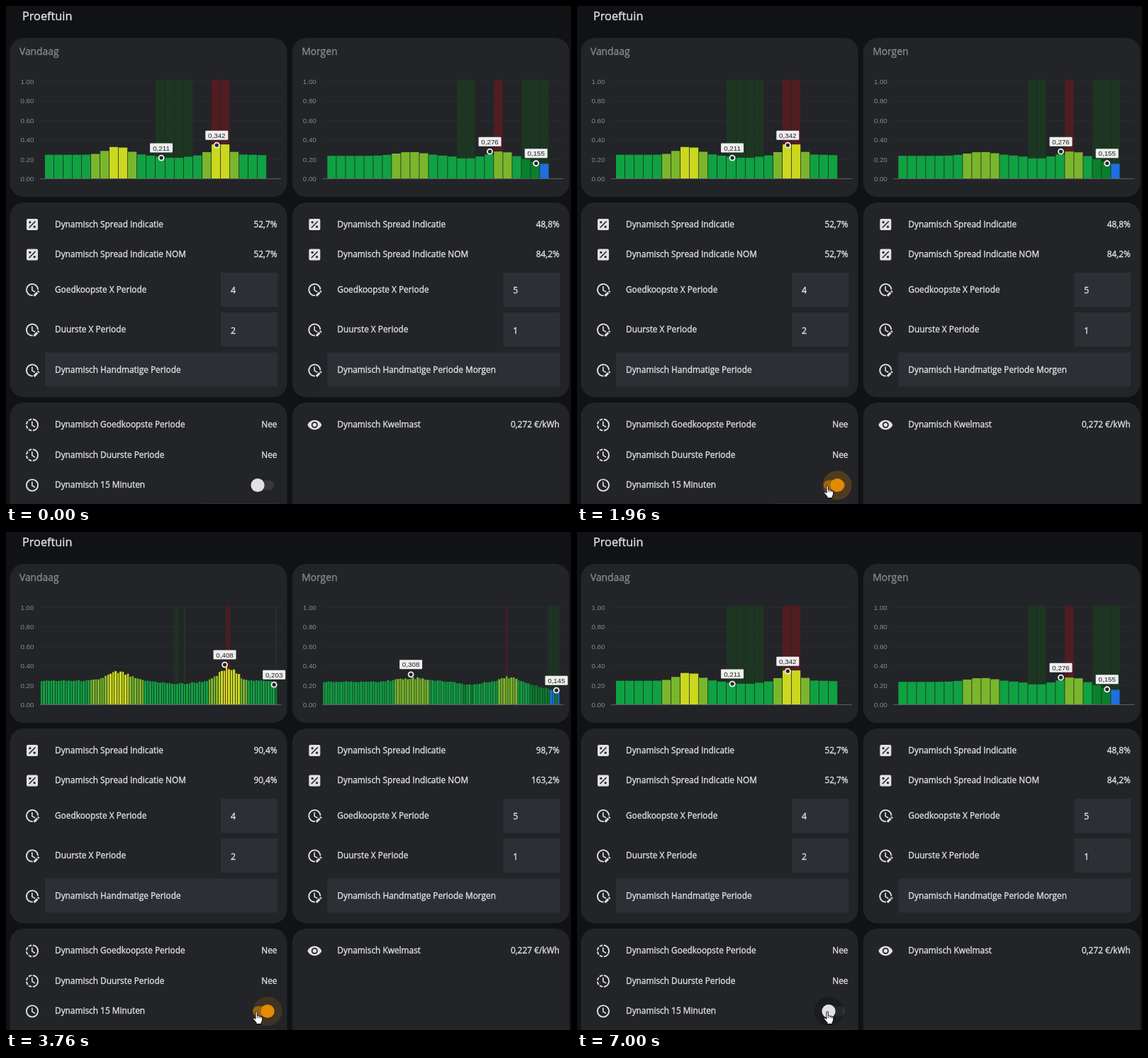
An HTML page with a canvas that plays this animation: 797 px wide and 702 px high, repeating every 8 s.

```html
<!DOCTYPE html>
<html lang="nl">
<head>
<meta charset="utf-8">
<title>Dashboard</title>
<style>
html, body { margin: 0; width: 100%; height: 100%; overflow: hidden; background: #111216; }
canvas { display: block; }
</style>
</head>
<body>
<canvas id="stage" width="797" height="702"></canvas>
<script>
const ctx = document.getElementById('stage').getContext('2d');
const LOOP = 8000, SHIFT = 398.3, LIGHT = '#e1e1e1', CARD = '#232428', FIELD = '#2d2f34';
const UI = '"Open Sans", "Noto Sans", sans-serif', CHART_FONT = '"Liberation Sans", Arial, sans-serif';

// Price levels: upper bound and bar colour
const LEVELS = [[0.158, '#1f6fe0'], [0.203, '#0a7f2c'], [0.25, '#10a143'], [0.3, '#7ab62c'], [0.365, '#cbd81e'], [1, '#f3d011']];

// A day is a base price with bumps: centre hour, width, height
const TODAY = {
  title: 'Vandaag', cheap: 4, costly: 2, seed: 3, base: 0.243,
  bumps: [[7.4, 1.6, 0.085], [18.5, 1.25, 0.125], [13.5, 2.2, -0.032], [24, 0.5, -0.2]],
  hourMarks: [[12, 0.211], [18, 0.342]],
  quarterMarks: [[74, 0.408], [94, 0.203]]
};
const TOMORROW = {
  title: 'Morgen', cheap: 5, costly: 1, seed: 8, base: 0.232,
  bumps: [[8.6, 2.2, 0.04], [18.4, 1.3, 0.05], [14.5, 1.3, -0.03], [23.5, 2.6, -0.085]],
  hourMarks: [[17, 0.276], [22, 0.155]],
  quarterMarks: [[35, 0.308], [94, 0.145]]
};

const clamp = v => Math.max(0, Math.min(1, v));
const mix = (a, b, k) => a + (b - a) * k;
const within = (t, start, end) => t >= start && t < end;
const ramp = (t, start, length) => {
  const v = clamp((t - start) / length);
  return v * v * (3 - 2 * v);
};
const random = n => {
  const v = Math.sin(n * 12.9898) * 43758.5453;
  return v - Math.floor(v);
};

function rect(x, y, w, h, color, radius = 0) {
  ctx.fillStyle = color;
  ctx.beginPath();
  ctx.roundRect(x, y, w, h, radius);
  ctx.fill();
}
function disc(x, y, r, color) {
  ctx.fillStyle = color;
  ctx.beginPath();
  ctx.arc(x, y, r, 0, 7);
  ctx.fill();
}
function arc(x, y, r, from, to, color, width) {
  ctx.strokeStyle = color;
  ctx.lineWidth = width;
  ctx.beginPath();
  ctx.arc(x, y, r, from * Math.PI / 180, to * Math.PI / 180);
  ctx.stroke();
}
function line(color, width, ...points) {
  ctx.strokeStyle = color;
  ctx.lineWidth = width;
  ctx.beginPath();
  points.forEach(([x, y]) => ctx.lineTo(x, y));
  ctx.stroke();
}
function text(str, x, y, { size = 11.85, color = LIGHT, align = 'left', font = UI } = {}) {
  ctx.font = `${size}px ${font}`;
  ctx.textAlign = align;
  ctx.fillStyle = ctx.strokeStyle = color;
  ctx.fillText(str, x, y);
  if (font !== UI) return;
  // A thin outline gives the interface text its medium weight
  ctx.lineWidth = 0.35;
  ctx.strokeText(str, x, y);
}

// Icons are drawn around their centre
const ring = (from, to) => arc(0, 0, 8.1, from, to, LIGHT, 1.9);
const hands = () => line(LIGHT, 1.6, [-0.2, -5], [-0.2, 0.6], [4, 3]);
const icons = {
  percent() {
    rect(-8, -8, 16, 16, LIGHT, 2);
    line(CARD, 1.6, [-4.5, 4.5], [4.5, -4.5]);
    disc(-3.2, -3.2, 1.6, CARD);
    disc(3.2, 3.2, 1.6, CARD);
  },
  clock() {
    ring(0, 360);
    hands();
  },
  edit() {
    ring(85, 358);
    hands();
    line(LIGHT, 3, [2.5, 8.6], [7.2, 3.9]);
    line(LIGHT, 3, [8, 3.1], [9.4, 1.7]);
  },
  progress() {
    ring(-84, 84);
    for (let a = 96; a < 260; a += 45) ring(a, a + 33);
    hands();
  },
  eye() {
    ctx.fillStyle = LIGHT;
    ctx.beginPath();
    ctx.moveTo(-10, 0);
    ctx.bezierCurveTo(-6.5, -9, 6.5, -9, 10, 0);
    ctx.bezierCurveTo(6.5, 9, -6.5, 9, -10, 0);
    ctx.fill();
    disc(0, 0, 4.5, CARD);
    disc(0, 0, 2.7, LIGHT);
  }
};
function row(icon, label, y, value) {
  ctx.save();
  ctx.translate(37, y + 0.5);
  icons[icon]();
  ctx.restore();
  text(label, 69, y + 4);
  if (value) text(value, 382.5, y + 4, { align: 'right' });
}

function priceAt(day, hour) {
  return day.bumps.reduce((sum, [centre, width, height]) => sum + height * Math.exp(-(((hour - centre) / width) ** 2)), day.base);
}
function dayPrices(day, quarterly) {
  if (!quarterly) return Array.from({ length: 24 }, (_, i) => priceAt(day, i));
  return Array.from({ length: 96 }, (_, i) => {
    const price = priceAt(day, (i + 0.5) / 4 - 0.5);
    const spread = 0.01 + 0.4 * Math.abs(price - day.base);
    return price + (random(i + 100 * day.seed) - 0.5) * spread;
  });
}

function drawChart(day, quarterly) {
  const top = v => 243 - v * 137;
  for (let i = 0; i <= 5; i++) {
    const y = Math.round(top(i / 5));
    line(i ? '#2a2b30' : '#5d5e63', 1, [48, y + 0.5], [388, y + 0.5]);
    text((i / 5).toFixed(2), 39.5, y + 3.5, { size: 9.8, color: '#88898e', align: 'right', font: CHART_FONT });
  }

  const prices = dayPrices(day, quarterly);
  const start = quarterly ? 49 : 55, pitch = quarterly ? 3.48 : 13.04;
  const bar = (slot, y, color) => {
    const x = Math.round(start + slot * pitch);
    rect(x, y, Math.round(start + (slot + 1) * pitch) - x - 0.8, 243 - y, color);
  };
  const ranked = prices.map((_, i) => i).sort((a, b) => prices[a] - prices[b]);
  ranked.slice(0, day.cheap).forEach(slot => bar(slot, 104, '#1d3621'));
  ranked.slice(-day.costly).forEach(slot => bar(slot, 104, '#501d21'));
  prices.forEach((price, slot) => bar(slot, top(price), LEVELS.find(([limit]) => price < limit)[1]));

  for (const [slot, value] of quarterly ? day.quarterMarks : day.hourMarks) {
    const x = start + (slot + 0.58) * pitch, y = top(value);
    disc(x, y, 4.4, '#f2f2f2');
    disc(x, y, 2.6, '#25272b');
    rect(x - 16, y - 20.5, 32, 13, '#eeeeee', 1);
    text(value.toFixed(3).replace('.', ','), x, y - 10.5, { size: 9.8, color: '#222', align: 'center', font: CHART_FONT });
  }
}

function drawColumn(day, quarterly, loading, spread, spreadNom, manual, t) {
  rect(5.5, 45, 391, 224, CARD, 20);
  rect(5.5, 277, 391, 274.5, CARD, 20);
  rect(5.5, 559, 391, 180, CARD, 20);
  text(day.title, 19, 69, { size: 13.8, color: '#88898d' });
  drawChart(day, quarterly);
  if (loading) {
    const mid = (t - 3350) * 0.342 - 5;
    arc(383.3, 58.5, 6, mid - 78, mid + 78, '#8b8c90', 1.8);
  }
  rect(303, 376, 80, 48, FIELD);
  rect(303, 432, 80, 48, FIELD);
  rect(55, 488.5, 328, 48, FIELD);
  row('percent', 'Dynamisch Spread Indicatie', 307.5, spread);
  row('percent', 'Dynamisch Spread Indicatie NOM', 350, spreadNom);
  row('edit', 'Goedkoopste X Periode', 399.5);
  row('edit', 'Duurste X Periode', 456);
  row('edit', manual, 513);
  text(day.cheap, 317, 405, { size: 12.3 });
  text(day.costly, 317, 461.5, { size: 12.3 });
}

function drawToggle(t) {
  const on = ramp(t, 1830, 170) - ramp(t, 5310, 170);
  const x = 355 + 14 * on, lit = on > 0.3;
  const glow = mix(0.2, 0.13, ramp(t, 1960, 250));
  rect(348, 668.5, 30, 14, lit ? '#8b5b10' : '#37383c', 7);
  ctx.globalAlpha = ramp(t, 1130, 140);
  disc(x, 675.5, 20.5, lit ? `rgba(255,152,0,${glow})` : 'rgba(17,18,21,.42)');
  ctx.globalAlpha = 1;
  disc(x, 675.5, 9.6, lit ? '#e38b05' : LIGHT);
}

function drawCursor(t) {
  if (t < 500) return;
  // Sweep left across the page, come back to the switch, then settle on it
  const sweep = ramp(t, 500, 400), back = ramp(t, 900, 400), settle = ramp(t, 1270, 280);
  const x = mix(mix(mix(720, 79, sweep), 383, back), 348, settle);
  const y = mix(mix(mix(519, 683, sweep), 665, back), 675, settle);
  ctx.save();
  ctx.translate(x, y);
  const hand = new Path2D('M4 1.5Q5.3 .2 6.4 1.5V7Q8 6.2 8.9 7.4Q10.4 6.8 11.2 8.2Q13.4 7.8 13.5 10V13Q13.3 15 12 16.5V18.5H5V16.5L.8 11.6Q.2 9.7 2 9.8L4 11.5Z');
  ctx.fillStyle = '#fff';
  ctx.strokeStyle = '#111';
  ctx.lineWidth = 1;
  ctx.fill(hand);
  ctx.stroke(hand);
  for (const knuckle of [6.6, 9, 11.3]) line('#111', 0.8, [knuckle, 7.5], [knuckle, 10.3]);
  ctx.restore();
}

function draw(t) {
  rect(0, 0, 797, 702, '#111216');
  text('Proeftuin', 23, 20, { size: 16.3 });
  const quarterPrices = within(t, 2170, 5660);
  const pick = (hourly, quarterly) => quarterPrices ? quarterly : hourly;
  const loadingUntil = (first, second) => within(t, 2240, first) || within(t, 5730, second);

  const spread = pick('52,7%', '90,4%');
  drawColumn(TODAY, within(t, 3690, 6930), loadingUntil(3690, 6930), spread, spread, 'Dynamisch Handmatige Periode', t);
  row('progress', 'Dynamisch Goedkoopste Periode', 590, 'Nee');
  row('progress', 'Dynamisch Duurste Periode', 632.5, 'Nee');
  row('clock', 'Dynamisch 15 Minuten', 675);
  rect(276, 701, 107, 1, FIELD);
  drawToggle(t);

  ctx.save();
  ctx.translate(SHIFT, 0);
  drawColumn(TOMORROW, within(t, 3760, 7000), loadingUntil(3760, 7000),
    pick('48,8%', '98,7%'), pick('84,2%', '163,2%'), 'Dynamisch Handmatige Periode Morgen', t);
  row('eye', 'Dynamisch Kwelmast', 590, pick('0,272 €/kWh', '0,227 €/kWh'));
  ctx.restore();
  drawCursor(t);
}

const origin = performance.now();
function tick() {
  draw((performance.now() - origin) % LOOP);
  requestAnimationFrame(tick);
}
tick();
</script>
</body>
</html>
```
